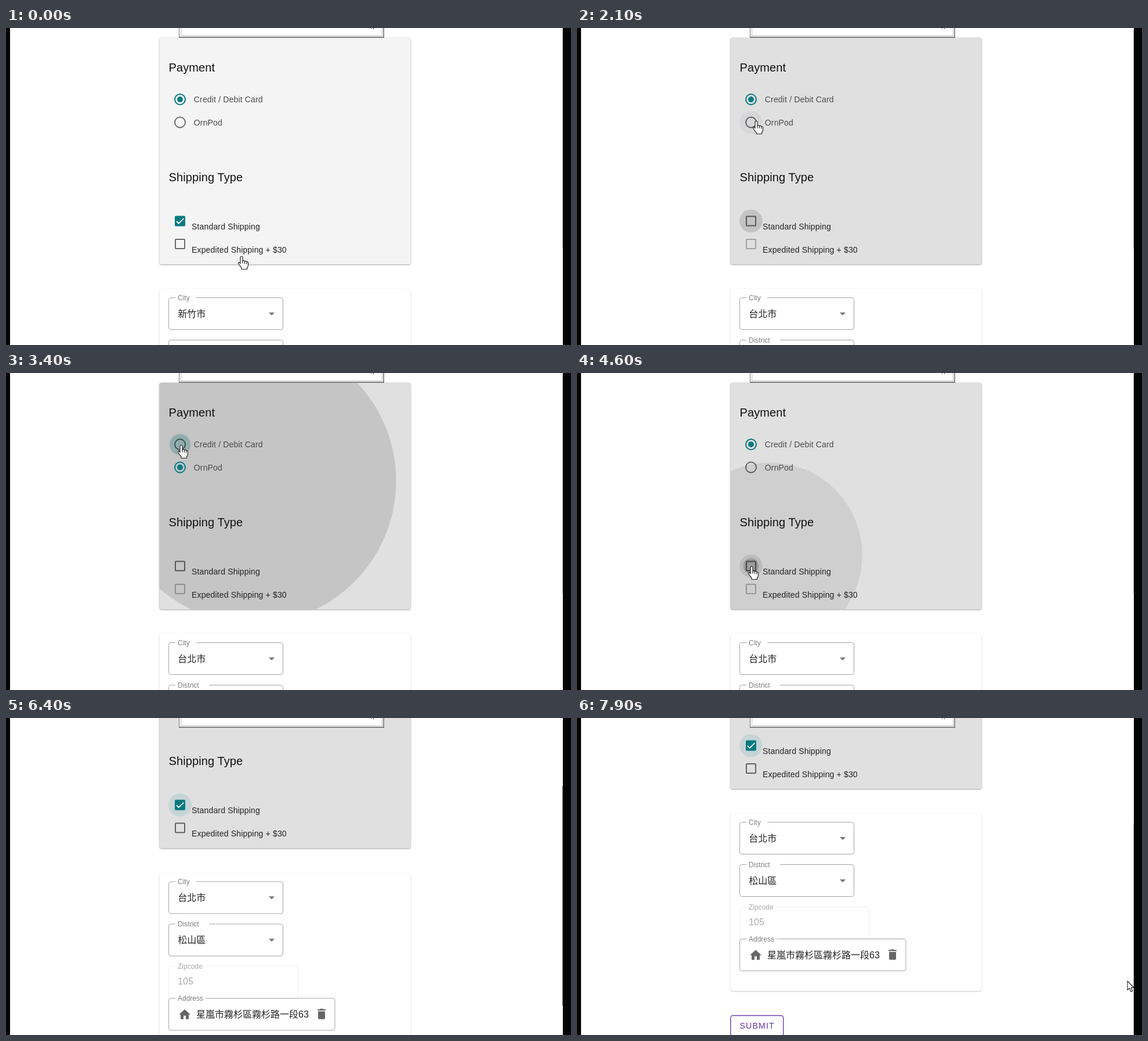
An HTML page for the animation above (8 s loop, 974x546 px).

```html
<!DOCTYPE html>
<html lang="en">
<head>
<meta charset="utf-8">
<title>Checkout form</title>
<style>
  html, body { margin: 0; width: 100%; height: 100%; overflow: hidden; background: #fff; }
  svg { display: block; width: 974px; height: 546px; }
  text { font-family: "Liberation Sans", Arial, "Noto Sans CJK TC", "Noto Sans CJK", sans-serif; white-space: pre; }
  .head { font-size: 20px; letter-spacing: .1px; fill: #111; }
  .body { font-size: 14px; letter-spacing: .16px; fill: #222; }
  .soft { fill: #4a4a4a; }
  .label { font-size: 12px; fill: #808080; }
  .value { font-size: 16px; fill: #222; font-weight: 300; }
  .faint { fill: #aaa; }
  .card { filter: drop-shadow(0 1px 1px rgba(0, 0, 0, .38)); }
  .pale { filter: drop-shadow(0 1px 1px rgba(0, 0, 0, .22)); }
</style>
</head>
<body>
<svg id="stage" viewBox="0 0 974 546">
  <defs>
    <clipPath id="cardClip"><rect x="264.5" y="16.5" width="433" height="390.5" rx="4"/></clipPath>
  </defs>
  <rect width="974" height="546" fill="#fff"/>
  <g id="page">
    <g class="card"><rect id="card" x="264.5" y="16.5" width="433" height="390.5" rx="4"/></g>
    <g clip-path="url(#cardClip)"><circle id="wave"/></g>
    <text class="head" x="280.5" y="75">Payment</text>
    <text class="head" x="280.5" y="264">Shipping Type</text>
    <g id="controls"></g>
    <text class="body soft" x="323.8" y="128">Credit / Debit Card</text>
    <text class="body soft" x="323.8" y="167.5">OrnPod</text>
    <text class="body" x="320" y="347">Standard Shipping</text>
    <text class="body" x="320" y="386.5">Expedited Shipping + $30</text>
    <g class="pale"><rect x="264.5" y="448.5" width="433" height="306.5" rx="4" fill="#fff"/></g>
    <g id="fields"></g>
    <g fill="#666">
      <path d="M308 684.5l-10 9h3v8h5v-6h4v6h5v-8h3z"/>
      <path d="M538 688v11.5q0 2 2 2h8q2 0 2-2v-11.5zM537 684.500h3.500l1-1h5l1 1h3.500v2h-14z"/>
    </g>
    <rect x="264.75" y="797.5" width="91" height="35" rx="4" fill="#fff" stroke="#6a3fb0" stroke-width="1.4"/>
    <text x="280.5" y="819.5" font-size="14" letter-spacing="1.25" fill="#5e2fab">SUBMIT</text>
  </g>
  <g fill="none">
    <path d="M298 -2H652V17H298z" fill="#fff"/>
    <path d="M298.5 -1V16" stroke="#777"/>
    <path d="M301.5 -1V13.5H648.5V-1" stroke="#bbb"/>
    <path d="M651 -1V16" stroke="#666" stroke-width="1.5"/>
    <path d="M298 16H652" stroke="#555" stroke-width="1.5"/>
    <path d="M629 0l1 1.5M633.5 0v2" stroke="#555"/>
  </g>
  <rect x="958.5" width="1.5" height="546" fill="#f4f4f4"/>
  <rect id="thumb" x="959" width="1" height="378"/>
  <g id="cursor" stroke="#222" stroke-linejoin="round">
    <path id="hand" fill="#fff" stroke-width="1.2" d="M-2 1.5Q0-1 2 1.5V8.5Q4 6.5 5.5 9Q7.5 7.5 8.7 9.8Q11 9 11.5 11.5V16Q11.5 18 9.5 20V22.5H0V20Q-3 16.5-5.5 12.5Q-6 10.5-4 10.5L-2 12.5zM2 8.5v4M5.5 9.5v3.5M8.7 10.5v3"/>
    <path id="arrow" fill="#fff" stroke-width="1.1" d="M0 0V15.5L3.5 12.3L6 18.5L8.7 17.3L6.2 11.5H11z"/>
  </g>
  <rect width="7" height="546" fill="#050505"/>
  <rect x="960" width="14" height="546" fill="#050505"/>
</svg>
<script>
const LOOP = 8000, STEP = 100;
const TEAL = '#017a82', GREY = 'rgba(0,0,0,.56)';
const $ = id => document.getElementById(id);

function set(el, attrs) {
  for (const k in attrs) el.setAttribute(k, attrs[k]);
  return el;
}
function add(parent, tag, attrs, text) {
  const el = set(document.createElementNS('http://www.w3.org/2000/svg', tag), attrs);
  if (text) el.textContent = text;
  parent.appendChild(el);
  return el;
}

// Form controls, each with a halo and a press ripple
function control(y) {
  const g = add($('controls'), 'g', { transform: `translate(300 ${y})` });
  return {
    g,
    halo: add(g, 'circle', { r: 19.8, opacity: 0 }),
    press: add(g, 'circle', { opacity: 0 }),
  };
}
function radio(y) {
  const c = control(y);
  c.ring = add(c.g, 'circle', { r: 9, fill: 'none', 'stroke-width': 2 });
  c.dot = add(c.g, 'circle', { r: 5, fill: TEAL });
  return c;
}
function checkbox(y) {
  const c = control(y);
  c.box = add(c.g, 'rect', { x: -8, y: -8, width: 16, height: 16, rx: 1, 'stroke-width': 2 });
  c.tick = add(c.g, 'path', { d: 'M-6 .5L-2.3 4.2L6.3 -4.3', fill: 'none', stroke: '#fff', 'stroke-width': 1.8 });
  return c;
}
const credit = radio(123), wallet = radio(162.5);
const standard = checkbox(332.5), expedited = checkbox(372);

function setRadio(c, on) {
  set(c.ring, { stroke: on ? TEAL : GREY });
  set(c.dot, { opacity: on ? 1 : 0 });
}
function setCheckbox(c, on, disabled) {
  set(c.box, { fill: on ? TEAL : 'none', stroke: on ? TEAL : disabled ? 'rgba(0,0,0,.28)' : GREY });
  set(c.tick, { opacity: on ? 1 : 0 });
}
function setHalo(c, color, opacity) {
  set(c.halo, { fill: color, opacity });
}

// Outlined fields with a notch for the label
function field(y, width, notch, label, value, opts = {}) {
  const g = add($('fields'), 'g', {});
  const l = 280.5, r = l + width, b = y + 55;
  const outline = add(g, 'path', { fill: 'none', stroke: opts.stroke || '#a3a3a3' });
  const drawOutline = gap => set(outline, {
    d: `M${gap ? notch : 292} ${y}H${r - 4}q4 0 4 4V${b - 4}q0 4-4 4H${l + 4}q-4 0-4-4V${y + 4}q0-4 4-4H292`
  });
  drawOutline(true);
  const cls = opts.faint ? ' faint' : '';
  const name = add(g, 'text', { class: 'label' + cls, x: 296, y: y + 4 }, label);
  const text = add(g, 'text', { class: 'value' + cls, x: opts.x || 296.2, y: y + (opts.faint ? 31.5 : 33.5) }, value);
  if (opts.menu) add(g, 'path', { d: `M453 ${y + 25.5}h10l-5 5z`, fill: '#757575' });
  return { name, text, drawOutline };
}
const city = field(464.5, 197, 328, 'City', '台北市', { menu: true });
const district = field(537.5, 197, 350, 'District', '松山區', { menu: true });
field(610.5, 223, 343, 'Zipcode', '105', { faint: true, stroke: '#eee' });
field(665.5, 286.5, 344, 'Address', '星嵐市霧杉區霧杉路一段63', { x: 328 });

// Motion
const cursorPath = [
  [0, 406, 393], [100, 470, 300], [500, 560, 360], [1000, 649, 471], [1500, 560, 62],
  [2000, 309, 160], [2700, 309, 160], [3200, 302, 124], [3900, 302, 124], [4400, 301, 333],
  [4700, 301, 333], [5000, 560, 414], [5400, 836, 330], [5600, 930, 264], [5900, 966, 190],
  [7500, 968, 470], [7900, 949, 453]
];
const scrollPath = [[0, 0], [6150, 0], [6300, 179], [6600, 193], [7100, 193], [7500, 285]];
const clicks = [
  { at: 2380, x: 309, y: 160, on: wallet, color: TEAL, strength: .24 },
  { at: 3300, x: 302, y: 126, on: credit, color: TEAL, strength: .24 },
  { at: 4550, x: 301, y: 335, on: standard, color: '#000', strength: .24 }
];

const clamp = v => Math.max(0, Math.min(1, v));
const mix = (a, b, f) => a + (b - a) * f;
const within = (t, a, b) => t >= a && t < b;

function sample(path, t) {
  let i = 0;
  while (i < path.length - 1 && path[i + 1][0] <= t) i++;
  const a = path[i], b = path[i + 1] || a;
  const f = b === a ? 0 : (t - a[0]) / (b[0] - a[0]);
  const eased = f * f * (3 - 2 * f);
  return a.slice(1).map((v, k) => mix(v, b[k + 1], eased));
}

// cubic-bezier(.4, 0, .2, 1)
function standardEase(x) {
  let lo = 0, hi = 1;
  for (let i = 0; i < 24; i++) {
    const u = (lo + hi) / 2, v = 1 - u;
    if (1.2 * v * v * u + .6 * v * u * u + u * u * u < x) lo = u; else hi = u;
  }
  return lo * lo * (3 - 2 * lo);
}

function drawRipples(t) {
  set($('wave'), { opacity: 0 });
  for (const c of clicks) {
    const dt = t - c.at;
    const f = standardEase(clamp(dt / 225));
    const level = dt < 0 ? 0 : clamp(dt / 75) * (1 - clamp((dt - 290) / 150));
    set(c.on.press, { r: mix(12, 20, f), fill: c.color, opacity: c.strength * level });
    if (level > 0) set($('wave'), {
      cx: mix(c.x, 481, f), cy: mix(c.y, 212, f), r: mix(130, 297, f), opacity: .12 * level
    });
  }
}

function draw(t) {
  const start = t < 100;
  const checked = start || t >= 4700;
  const walletOn = within(t, 2500, 3500);
  const dragging = within(t, 6100, 7500);

  set($('card'), { fill: start ? '#f4f4f4' : '#e0e0e0' });
  setRadio(credit, !walletOn);
  setRadio(wallet, walletOn);
  setCheckbox(standard, checked, false);
  setCheckbox(expedited, false, !checked);

  setHalo(credit, t < 3500 ? '#000' : TEAL,
    within(t, 3200, 3500) ? .04 : within(t, 3500, 4500) ? .12 : 0);
  setHalo(wallet, walletOn ? TEAL : '#22225a',
    within(t, 2000, 2500) ? .045 : within(t, 2500, 3300) ? .12 : 0);
  setHalo(standard, t < 4700 ? '#000' : TEAL,
    within(t, 100, 2400) ? .13 : within(t, 4400, 4700) ? .09 : t >= 4700 ? .12 : 0);

  city.text.textContent = start ? '新竹市' : '台北市';
  district.drawOutline(!start);
  set(district.name, { opacity: start ? 0 : 1 });
  set(district.text, { opacity: start ? 0 : 1 });

  drawRipples(t);

  const [scroll] = sample(scrollPath, t);
  set($('page'), { transform: `translate(0 ${-scroll})` });
  set($('thumb'), { y: (start ? 0 : 2) + scroll * .632, fill: dragging ? '#787878' : '#c4c4c4' });

  const [x, y] = sample(cursorPath, t);
  const overCard = within(x, 264, 698) && within(y, 17, 407);
  set($('cursor'), { transform: `translate(${x} ${y})` });
  set($('hand'), { opacity: overCard ? 1 : 0 });
  set($('arrow'), { opacity: overCard ? 0 : 1 });
}

const begin = performance.now();
function tick() {
  const t = (performance.now() - begin) % LOOP;
  draw(Math.floor(t / STEP) * STEP);
  requestAnimationFrame(tick);
}
tick();
</script>
</body>
</html>
```
